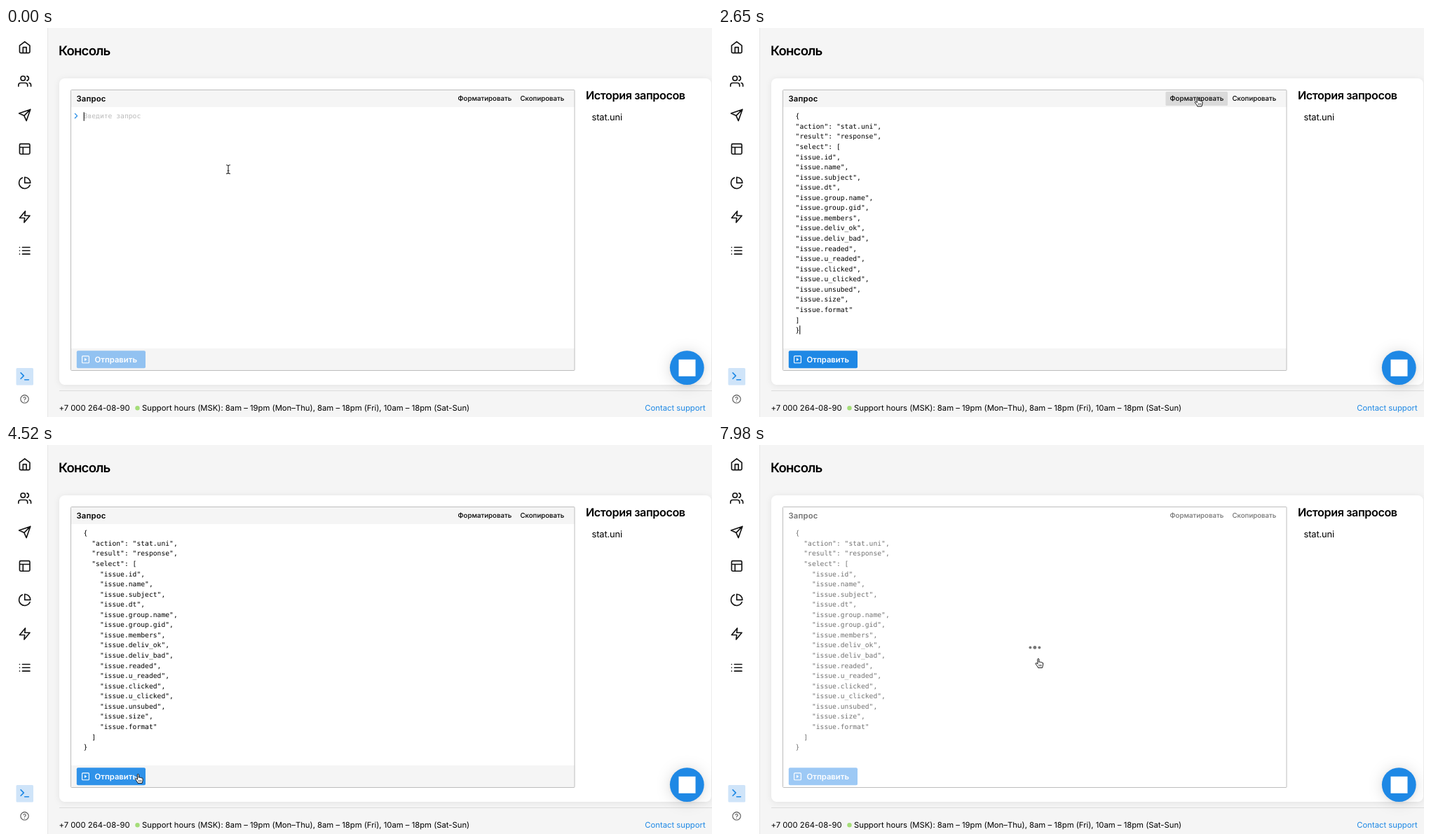
An HTML page for the animation above (8000 ms loop, 1007 by 556 pixels).

```html
<!DOCTYPE html>
<html lang="ru">
<head>
<meta charset="utf-8">
<title>Консоль</title>
<style>
html, body { margin: 0; width: 100%; height: 100%; overflow: hidden; background: #f5f5f5 }
svg { display: block; width: 1007px; height: 556px; font: 11.31px Inter, sans-serif; text-rendering: geometricPrecision }
.bold { font-weight: 600 }
.small { font-size: 9.7px; font-weight: 500 }
.foot { letter-spacing: -.001em }
.mono { font: 9.7px "DejaVu Sans Mono", monospace }
.icon { fill: none; stroke: #111; stroke-width: 2; stroke-linecap: round; stroke-linejoin: round }
.card { filter: drop-shadow(0 1px 4px rgba(0,0,0,.08)) }
.chat { filter: drop-shadow(0 1px 2.4px rgba(0,0,0,.06)) drop-shadow(0 1.6px 10px rgba(0,0,0,.14)) }
</style>
</head>
<body>
<svg viewBox="0 0 1007 556">
  <path fill="#fff" d="M0 0h59v556H0z"/>
  <path fill="#e6e6e6" d="M59 0h1v556h-1z"/>
  <g id="menu"></g>
  <rect x="14.5" y="486" width="24.5" height="24.5" rx="1.5" fill="#cfe4f9"/>
  <path class="icon" transform="translate(18.3 489.4) scale(.7)" style="stroke:#1e88e5;stroke-width:2.3" d="M4 17l6-6-6-6M12 19h8"/>
  <path class="icon" transform="translate(19.7 523.5) scale(.57)" style="stroke:#555" d="M2 12a10 10 0 1 0 20 0a10 10 0 1 0-20 0M9.09 9a3 3 0 0 1 5.83 1c0 2-3 3-3 3M12 17h.01"/>

  <text x="75" y="38.7" class="bold" style="font-size:18.6px;letter-spacing:-.8px">Консоль</text>
  <rect class="card" x="76" y="72" width="930" height="438" rx="8" fill="#fff"/>
  <text x="827" y="102" class="bold" style="font-size:16.16px;letter-spacing:-.025em">История запросов</text>
  <text x="835.5" y="131.6" style="font-size:12.93px;letter-spacing:-.011em">stat.uni</text>

  <path id="bars" fill="#f5f5f5" d="M93 89h718v24H93zM93 458h718v31H93z"/>
  <rect x="92.5" y="88.5" width="718.5" height="401" rx="1" fill="none" stroke="#bdbdbd"/>
  <rect id="hover" x="638.5" y="91" width="88.5" height="20" rx="1.5" fill="#dadada"/>
  <g id="editor">
    <text x="100.5" y="105" class="bold" letter-spacing=".15">Запрос</text>
    <text x="644.5" y="104.3" class="small">Форматировать</text>
    <text x="733.5" y="104.3" class="small">Скопировать</text>
    <g id="code" class="mono"></g>
  </g>
  <g id="empty">
    <path class="icon" style="stroke:#1e88e5;stroke-width:1.3" d="M98.4 122.4l3.2 3.2-3.2 3.2"/>
    <text x="110.6" y="129.3" class="mono" fill="#bbb">Введите запрос</text>
  </g>
  <rect id="caret" width="1" height="12.5"/>

  <rect id="send" x="100.8" y="461.2" width="98.2" height="25" rx="2"/>
  <rect x="108.6" y="468.9" width="9.8" height="9.8" rx="1" fill="none" stroke="#fff" stroke-width="1.1"/>
  <path fill="#fff" d="M112 471.5v4.6l3.4-2.3z"/>
  <text x="126.5" y="477.8" class="bold" fill="#fff">Отправить</text>
  <g id="dots" fill="#777"></g>

  <path fill="#dcdcdc" d="M76 518h931v1H76z"/>
  <g class="foot">
    <text x="75.5" y="547.2">+7 000 264-08-90</text>
    <circle cx="187.5" cy="543.3" r="3.2" fill="#a4dd78"/>
    <text x="194" y="547.2">Support hours (MSK): 8am – 19pm (Mon–Thu), 8am – 18pm (Fri), 10am – 18pm (Sat-Sun)</text>
    <text x="911.3" y="547.2" fill="#1e88e5">Contact support</text>
  </g>
  <circle class="chat" cx="971.3" cy="485.6" r="24.4" fill="#1e88e5"/>
  <rect x="959.5" y="473.8" width="24" height="24" fill="#fff"/>

  <g id="cursor">
    <path id="beam" fill="none" stroke="#222" stroke-width="1.1" d="M-3-6.2Q-.3-6.2 0-5Q.3-6.2 3-6.2M0-5V5M-3 6.2Q-.3 6.2 0 5Q.3 6.2 3 6.2M-1.5 2h3"/>
    <path id="arrow" stroke="#fff" stroke-width=".8" d="M0 0V11.2L2.7 8.8 4.4 12.6 6.2 11.8 4.5 8.2H8Z"/>
    <g id="hand" transform="translate(1 .4)" stroke="#111" stroke-width="1" stroke-linejoin="round">
      <path fill="#fff" d="M-.6.8C-.6-.3 1.4-.3 1.4.8V5c.3-.8 1.8-.7 2 .3c.4-.7 1.8-.5 2 .5c.6-.5 1.7-.2 1.7.8V9c0 1.8-1 2.2-1 4H0C-.2 11.5-2 9.8-3.3 7.6C-4 6.4-2.6 5.6-1.6 6.7L-.6 7.8Z"/>
      <path stroke-width=".7" d="M1.3 8.4v2.6M3 8.4v2.6M4.7 8.4v2.6"/>
    </g>
  </g>
</svg>
<script>
const $ = id => document.getElementById(id);
const LOOP = 8000, STEP = 88.7, LINE = 14.56, CHAR = 5.84;
const PASTE = 1590, FORMAT = 2990, LOAD = 4780;

function add(parent, tag, attrs, text = '') {
  const el = document.createElementNS('http://www.w3.org/2000/svg', tag);
  for (const k in attrs) el.setAttribute(k, attrs[k]);
  el.textContent = text;
  return parent.appendChild(el);
}

[
  'M3 9l9-7 9 7v11a2 2 0 0 1-2 2H5a2 2 0 0 1-2-2zM9 22V12h6v10',
  'M17 21v-2a4 4 0 0 0-4-4H5a4 4 0 0 0-4 4v2M5 7a4 4 0 1 0 8 0a4 4 0 1 0-8 0M23 21v-2a4 4 0 0 0-3-3.87M16 3.13a4 4 0 0 1 0 7.75',
  'M22 2L11 13M22 2l-7 20-4-9-9-4z',
  'M5 3h14a2 2 0 0 1 2 2v14a2 2 0 0 1-2 2H5a2 2 0 0 1-2-2V5a2 2 0 0 1 2-2zM3 9h18M9 21V9',
  'M21.21 15.89A10 10 0 1 1 8 2.83M22 12A10 10 0 0 0 12 2v10z',
  'M13 2L3 14h9l-1 8 10-12h-9z',
  'M8 6h13M8 12h13M8 18h13M3 6h.01M3 12h.01M3 18h.01'
].forEach((d, i) => add($('menu'), 'path',
  { d, class: 'icon', transform: `translate(17 ${17.9 + 48.45 * i}) scale(.808)` }));

const fields = 'id name subject dt group.name group.gid members deliv_ok deliv_bad readed u_readed clicked u_clicked unsubed size format'.split(' ');
const lines = [
  [0, '{'], [1, '"action": "stat.uni",'], [1, '"result": "response",'], [1, '"select": ['],
  ...fields.map((f, i) => [2, `"issue.${f}"` + (i < fields.length - 1 ? ',' : '')]),
  [1, ']'], [0, '}']
];
const rows = lines.map(([, s], i) => add($('code'), 'text', { y: 129.3 + LINE * i }, s));
const dots = [0, 1, 2].map(i => add($('dots'), 'circle', { cx: 445.4 + 6.5 * i, cy: 289.4 }));

const clamp = v => Math.max(0, Math.min(1, v));
const cubic = p => p < .5 ? 4 * p ** 3 : 1 - 4 * (1 - p) ** 3;
const smooth = p => p * p * (3 - 2 * p);
const show = (id, on) => $(id).setAttribute('visibility', on ? 'visible' : 'hidden');

// start, end, destination of the pointer
const moves = [
  [1951, 2820, 692, 96], [2820, 2998, 690, 105],
  [3361, 4520, 187, 470], [4520, 4790, 186, 470.5], [5051, 5850, 455.5, 305]
];
function pointer(t) {
  let x = 317, y = 202;
  for (const [from, to, nx, ny] of moves) {
    const p = cubic(clamp((t - from) / (to - from)));
    x += (nx - x) * p;
    y += (ny - y) * p;
  }
  return [x, y];
}

function pointerKind(x, y, t) {
  if (t >= LOAD) return t < 7900 ? 'arrow' : 'hand';
  const inside = (l, top, r, b) => x >= l && x <= r && y >= top && y <= b;
  if (inside(638, 91, 727, 111) || inside(101, 461, 199, 486)) return 'hand';
  return inside(93, 113, 811, 458) ? 'beam' : 'arrow';
}

function dotScale(t) {
  const p = ((t % 1400) + 1400) % 1400 / 560;
  return p < 1 ? smooth(p) : p < 2 ? smooth(2 - p) : 0;
}

function draw(now) {
  const raw = now % LOOP;
  // from the first pointer move on, the picture advances in even steps
  const t = raw < 2040 ? raw : 2040 + STEP * Math.floor((raw - 2040 + 18) / STEP);
  const pasted = t >= PASTE, loading = t >= LOAD;

  show('empty', !pasted);
  show('code', pasted);
  rows.forEach((row, i) => row.setAttribute('x', 110.6 + (t >= FORMAT ? lines[i][0] * 2 * CHAR : 0)));
  show('caret', t < 120 || t >= 600 && t < 1140 || pasted && t < 2040 || t >= 2560 && t < FORMAT);
  $('caret').setAttribute('x', pasted ? 116.3 : 110.7);
  $('caret').setAttribute('y', pasted ? 425.3 : 120.3);

  const [x, y] = pointer(t), kind = pointerKind(x, y, t);
  $('cursor').setAttribute('transform', `translate(${x} ${y})`);
  for (const k of ['beam', 'arrow', 'hand']) show(k, k === kind);

  $('hover').setAttribute('opacity', t < 2540 ? 0 : clamp(1 - (t - 3600) / 270));
  $('send').setAttribute('fill', !pasted ? '#92c2f1' : loading ? '#9dc9f5'
    : kind === 'hand' && y > 400 ? '#2f92e9' : '#1e88e5');
  show('bars', !loading);
  $('editor').setAttribute('opacity', loading ? .55 : 1);
  show('dots', loading);
  dots.forEach((dot, i) => dot.setAttribute('r', 2.45 * dotScale(t - 7260 - 160 * i)));
}

let start;
function tick(now) {
  start ??= now;
  draw(now - start);
  requestAnimationFrame(tick);
}
draw(0);
requestAnimationFrame(tick);
</script>
</body>
</html>
```
